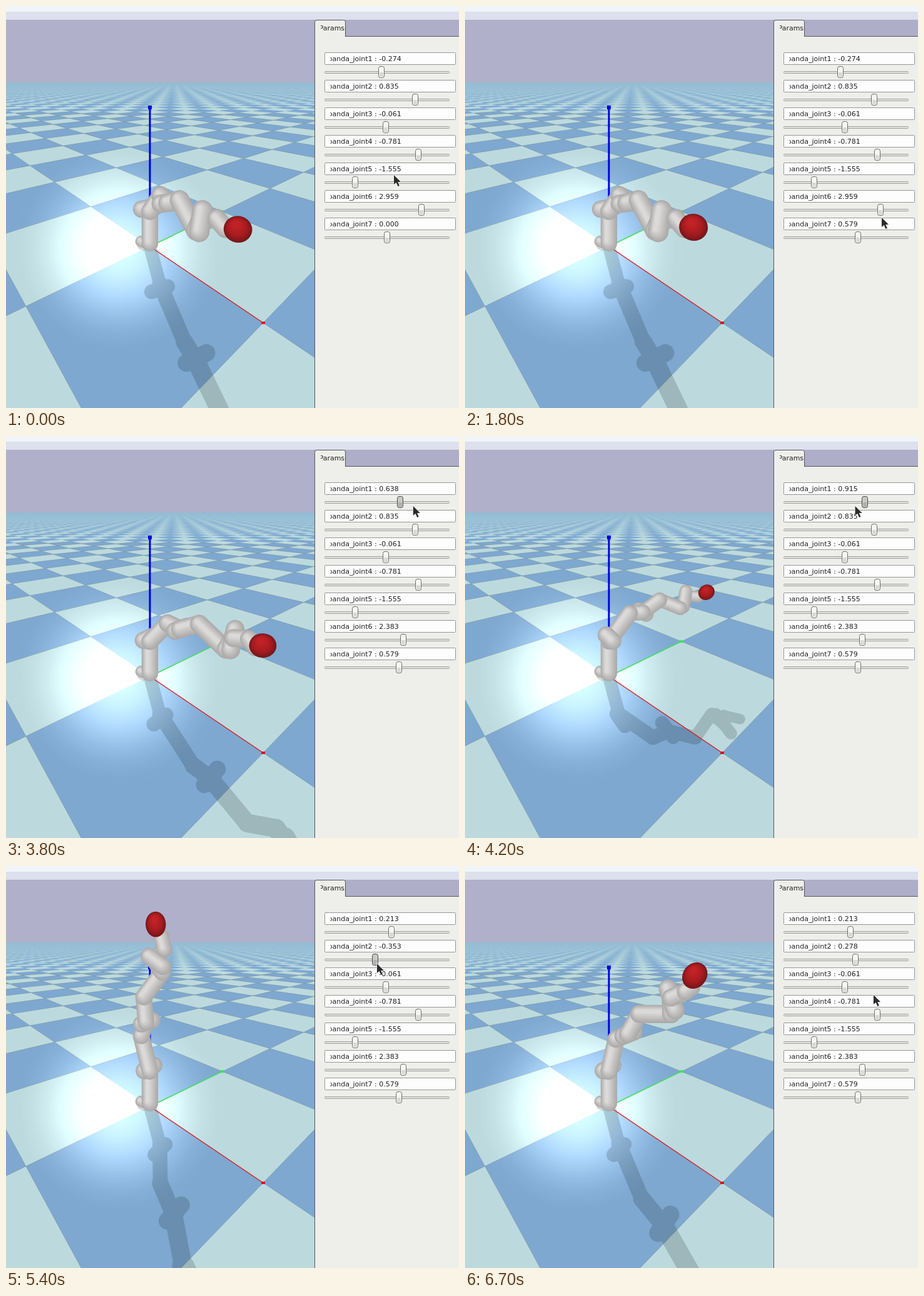
Recreate the animation shown at these times as an HTML page with a canvas. Size 724 px wide and 642 px high, loop 6.8 s.

```html
<!DOCTYPE html>
<html>
<head>
<meta charset="utf-8">
<style>
html, body { margin: 0; width: 724px; height: 642px; overflow: hidden; }
canvas { display: block; }
</style>
</head>
<body>
<canvas id="stage" width="724" height="642"></canvas>
<script>
const W = 724, H = 642, VIEW = 494, LOOP = 6800;
const LAG = 120; // the motors trail the sliders, the sliders trail the cursor
const ctx = document.getElementById('stage').getContext('2d');

function layer() {
  const c = document.createElement('canvas');
  c.width = VIEW; c.height = H;
  return c.getContext('2d');
}

// World to screen; w grows with depth
function project([x, y, z]) {
  const w = 1 - .3144 * x + .262 * y - .2217 * z;
  return {
    x: (230 + 51.8 * x + 206.5 * y - 51 * z) / w,
    y: (384 - 37.1 * x + 30.1 * y - 257.9 * z) / w,
    w
  };
}
const shadowOf = ([x, y, z]) => project([x + 1.27 * z, y - .785 * z, 0]);
const mix = (u, a, v, b) => u.map((n, i) => n * a + v[i] * b);

// Linear path through keys [time, value, ...]
function track(keys, t) {
  if (keys.length < 2) return keys[0].slice(1);
  let i = 0;
  while (i < keys.length - 2 && t > keys[i + 1][0]) i++;
  const [a, b] = [keys[i], keys[i + 1]];
  const k = Math.min(1, Math.max(0, (t - a[0]) / (b[0] - a[0])));
  return mix(a, 1 - k, b, k).slice(1);
}

// Each slider: limits, then value keys
const sliders = [
  [-2.9, 2.9, [3600, -.274], [4000, 1.55], [4200, .915], [4350, .213]],
  [-1.76, 1.76, [4900, .835], [5280, -.353], [5920, -.353], [6100, -.019], [6500, .278]],
  [-2.9, 2.9, [0, -.061]],
  [-3.07, -.07, [0, -.781]],
  [-2.9, 2.9, [0, -1.555]],
  [-.02, 3.75, [2000, 2.959], [2600, 2.383]],
  [-2.9, 2.9, [650, 0], [1300, .579]]
].map(([lo, hi, ...keys], row) => {
  const from = keys[0][0], to = keys[keys.length - 1][0];
  const value = t => track(keys, t)[0];
  return {
    value, from, to,
    y: 74 + 44 * row,
    knob: t => 514 + 190 * (value(t) - lo) / (hi - lo),
    held: t => t >= from && t < to
  };
});

const grip = (s, t) => [s.knob(t + LAG) + 3, s.y + 38];
const stops = [[0, 620, 270], [1800, 666, 338], [3100, 552, 269], [6700, 653, 206]];
for (const s of sliders) {
  if (s.to > s.from) stops.push([s.from, ...grip(s, s.from)], [s.to, ...grip(s, s.to)]);
}
stops.sort((a, b) => a[0] - b[0]);

function cursorAt(t) {
  const s = sliders.find(s => s.held(t));
  return s ? grip(s, t) : track(stops, t);
}

// Joint frames: [offset along old x, quarter turn about x, offset along new z]
const links = [
  [0, 0, .333], [0, -1, 0], [0, 1, .316], [.0825, 1, 0],
  [-.0825, -1, .384], [0, 1, 0], [.088, 1, 0]
];

function frames(q) {
  let f = { o: [0, 0, 0], x: [1, 0, 0], y: [0, 1, 0], z: [0, 0, 1] };
  return [f, ...links.map(([a, turn, d], i) => {
    const y = turn ? mix(f.z, turn, f.z, 0) : f.y;
    const z = turn ? mix(f.y, -turn, f.y, 0) : f.z;
    const c = Math.cos(q[i]), s = Math.sin(q[i]);
    return f = { o: mix(mix(f.o, 1, f.x, a), 1, z, d), x: mix(f.x, c, y, s), y: mix(f.x, -s, y, c), z };
  })];
}

// A tapering spine through the frames, plus a hub along every bending axis
function armParts(f) {
  const at = (i, z = 0, y = 0, x = 0) =>
    mix(mix(mix(f[i].o, 1, f[i].z, z), 1, f[i].y, y), 1, f[i].x, x);
  const spine = [
    at(0, .03), at(1, -.03), at(3, -.08), at(4), at(5, -.24),
    at(5, -.03, .08), at(6), at(7), at(7, .1)
  ];
  const parts = spine.slice(1).map((to, i) => ({ from: spine[i], to, r: .062 - .0025 * i }));
  for (const i of [2, 4, 6]) parts.push({ from: at(i, -.07), to: at(i, .05), r: .068 - .003 * i });
  parts.push({ from: at(0, .02, -.03, -.08), to: at(0, .02), r: .045 });
  return { parts, ball: at(7, .157, .028, .03) };
}

function stroke(g, a, b, width, color, shift = 0) {
  g.strokeStyle = color;
  g.lineWidth = width;
  g.beginPath();
  g.moveTo(a.x + shift, a.y + shift);
  g.lineTo(b.x + shift, b.y + shift);
  g.stroke();
}

function drawPart(p) {
  const r = p.r * 205 / p.w;
  for (let k = 0; k < 9; k++) {
    const v = 170 + k * 6;
    stroke(ctx, p.a, p.b, 2 * r * (1 - k * .1), `rgb(${v + 2},${v},${v - 1})`, -r * k * .035);
  }
}

function drawBall(p) {
  const r = 12.5 / p.w, dx = p.x - 247, dy = p.y - 332;
  const turn = Math.atan2(dy, dx), stretch = Math.sqrt(1 + .8 * (dx * dx + dy * dy) / 177000);
  ctx.save();
  ctx.translate(p.x, p.y);
  ctx.rotate(turn);
  ctx.scale(stretch, 1 / stretch);
  ctx.rotate(-turn);
  const g = ctx.createRadialGradient(-r * .15, -r * .4, r * .2, 0, 0, r);
  g.addColorStop(0, '#c22226');
  g.addColorStop(.6, '#a51b1f');
  g.addColorStop(1, '#70171a');
  ctx.fillStyle = g;
  ctx.beginPath();
  ctx.arc(0, 0, r, 0, 7);
  ctx.fill();
  ctx.restore();
}

function makeFloor() {
  const g = layer();
  g.fillStyle = '#b0b0ca';
  g.fillRect(0, 0, VIEW, H);
  g.beginPath();
  g.rect(0, 122, VIEW, H);
  g.clip();
  g.fillStyle = '#bcdade';
  g.fillRect(0, 122, VIEW, H);
  g.fillStyle = '#7ea8d0';
  g.strokeStyle = 'rgba(110,125,130,.6)';
  g.lineWidth = .7;
  for (let i = -90; i < 14; i++) for (let j = -20; j < 90; j++) {
    if (!((i + j) & 1)) continue;
    const p = [[i, j], [i + 1, j], [i + 1, j + 1], [i, j + 1]].map(([x, y]) => project([x, y, 0]));
    if (p.some(c => c.w < .05)) continue;
    g.beginPath();
    p.forEach(c => g.lineTo(c.x, c.y));
    g.closePath();
    g.fill();
    if (p[0].w < 5) g.stroke();
  }
  const haze = g.createLinearGradient(0, 122, 0, 165);
  haze.addColorStop(0, 'rgba(146,188,211,1)');
  haze.addColorStop(.3, 'rgba(150,190,212,.6)');
  haze.addColorStop(1, 'rgba(150,190,212,0)');
  g.fillStyle = haze;
  g.fillRect(0, 122, VIEW, 43);
  g.globalCompositeOperation = 'lighter';
  const glow = g.createRadialGradient(180, 388, 0, 180, 388, 180);
  for (let k = 0; k <= 1; k += .125) {
    glow.addColorStop(k, `rgba(255,250,238,${.36 * (1 - k * k) ** 3})`);
  }
  g.fillStyle = glow;
  g.fillRect(0, 200, 380, 380);
  return g.canvas;
}
const floor = makeFloor(), shade = layer();
shade.lineCap = 'round';

function drawAxis(end, color, width, size) {
  const a = project([0, 0, 0]), b = project(end);
  stroke(ctx, a, b, width, color);
  ctx.fillStyle = color;
  ctx.fillRect(b.x - 3, b.y - size / 2, 6, size);
}

function drawScene(q) {
  const { parts, ball } = armParts(frames(q));
  ctx.drawImage(floor, 0, 0);

  shade.clearRect(0, 0, VIEW, H);
  for (const p of parts) {
    const a = shadowOf(p.from), b = shadowOf(p.to);
    if (Math.min(a.w, b.w) > .1) stroke(shade, a, b, p.r * 600 / (a.w + b.w), '#0a1414');
  }
  ctx.globalAlpha = .17;
  ctx.drawImage(shade.canvas, 0, 0);
  ctx.globalAlpha = 1;

  ctx.lineCap = 'butt';
  drawAxis([1, 0, 0], '#e01018', 1.2, 4);
  drawAxis([0, 1, 0], '#40e060', 1.6, 4);
  drawAxis([0, 0, 1], '#0000e6', 3, 6);

  ctx.lineCap = 'round';
  const items = parts.map(p => {
    const a = project(p.from), b = project(p.to);
    return { a, b, r: p.r, w: (a.w + b.w) / 2, paint: drawPart };
  });
  items.push({ ...project(ball), paint: drawBall });
  items.sort((m, n) => n.w - m.w).forEach(item => item.paint(item));
}

function box(x, y, w, h, r, fill, line) {
  ctx.beginPath();
  ctx.roundRect(x + .5, y + .5, w, h, r);
  ctx.fillStyle = fill;
  ctx.fill();
  ctx.strokeStyle = line;
  ctx.lineWidth = 1;
  ctx.stroke();
}

function rect(x, y, w, h, color) {
  ctx.fillStyle = color;
  ctx.fillRect(x, y, w, h);
}

// Text whose first letter is cut off at the left
function cutText(text, x, y, cut) {
  ctx.save();
  ctx.beginPath();
  ctx.rect(x + cut, y - 14, 210, 18);
  ctx.clip();
  ctx.fillStyle = '#202020';
  ctx.fillText(text, x, y);
  ctx.restore();
}

function drawPanel(t, [mx, my]) {
  rect(0, 0, W, 9, '#eff5f9');
  rect(0, 9, W, 13, '#dde0ed');
  rect(VIEW, 22, 230, H, '#eeeeea');
  rect(VIEW, 22, 230, 26, '#aeaec9');
  rect(493, 24, 1, H, '#55555c');
  rect(543, 48, 181, 1, '#55555c');
  box(493, 22, 49, 30, [3, 3, 0, 0], '#eeeeea', '#55555c');
  rect(VIEW, 49, 60, 6, '#eeeeea');
  ctx.font = '11px "DejaVu Sans", sans-serif';
  cutText('Params', 500.5, 39, 2.5);

  sliders.forEach((s, i) => {
    const x = Math.round(s.knob(t)), y = s.y + 22;
    box(509, s.y, 209, 19, 1, '#fdfdfd', '#979795');
    cutText(`panda_joint${i + 1} : ${s.value(t).toFixed(3)}`, 514.5, s.y + 14, 4);
    box(509, s.y + 30, 199, 3, 1, '#e2e2de', '#a0a09e');
    const over = Math.abs(mx - x) < 7 && my > y - 4 && my < y + 16;
    const hot = s.held(t) || over;
    box(x - 5, y, 9, 18, 3, hot ? '#c9c9c6' : '#f6f6f4', hot ? '#4a4a4a' : '#6c6c6c');
    rect(x - 3, y + 10, 6, 7, hot ? '#b0b0ae' : '#d9d9d6');
  });
}

const arrow = new Path2D('M0 0V15L3.6 11.8L6.4 18L8.8 17L6.2 11H11Z');
function drawCursor([x, y]) {
  ctx.save();
  ctx.translate(x, y);
  ctx.strokeStyle = '#f4f4f4';
  ctx.lineWidth = 1.4;
  ctx.stroke(arrow);
  ctx.fillStyle = '#2b2b2b';
  ctx.fill(arrow);
  ctx.restore();
}

function draw(now) {
  const t = Math.floor(now % LOOP / 100) * 100;
  const cursor = cursorAt(t);
  drawScene(sliders.map(s => s.value(t - LAG)));
  drawPanel(t, cursor);
  drawCursor(cursor);
}

const start = performance.now();
function tick() {
  draw(performance.now() - start);
  requestAnimationFrame(tick);
}
tick();
</script>
</body>
</html>
```
